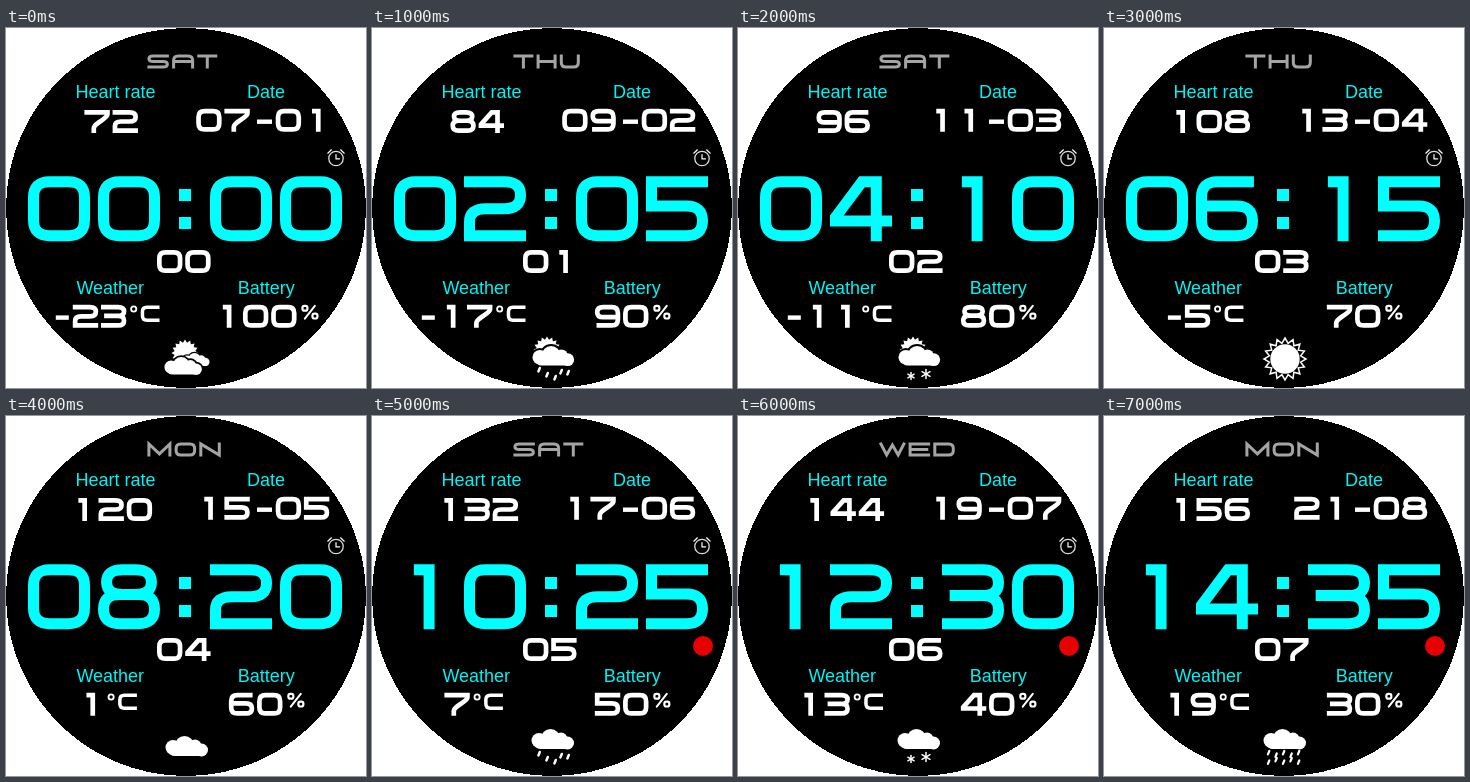
Recreate the animation shown at these times as an HTML page. Size 360 by 360 pixels, loop 8 s.

```html
<!DOCTYPE html>
<html lang="en">
<head>
<meta charset="utf-8">
<title>Watch face</title>
<style>
  html, body { margin: 0; width: 100%; height: 100%; overflow: hidden; background: #fff; }
  svg { display: block; width: 100vw; height: 100vh; }
  text { font: 18px "Liberation Sans", Arial, sans-serif; fill: #00f4f4; }
  .line { fill: none; stroke-linecap: square; stroke-linejoin: miter; }
  .thin { fill: none; stroke: #fff; stroke-linecap: round; }
  .soft { filter: blur(.55px); }
</style>
</head>
<body>
<svg viewBox="0 0 360 360">
  <circle cx="180" cy="180" r="180" shape-rendering="crispEdges"/>
  <text x="69.4" y="70">Heart rate</text>
  <text x="241" y="70">Date</text>
  <text x="70.4" y="266">Weather</text>
  <text x="231.7" y="266">Battery</text>
  <g id="live"></g>
</svg>
<script>
// Corner points of each glyph in a unit box; "!" keeps a corner sharp.
const GLYPHS = {
  0: '0,0 1,0 1,1 0,1 z',
  1: '.39,0 .58,0! .58,1',
  2: '0,0 1,0 1,.5 0,.5 0,1! 1,1',
  3: '0,0 1,0 1,.48 .15,.48|.15,.48 1,.48 1,1 0,1',
  4: '1,.73 0,.73! 0,.66! .52,0! .8,0! .8,1',
  5: '1,0 0,0! 0,.45! 1,.45 1,1 0,1',
  6: '.92,0 0,0 0,1 1,1 1,.45 0,.45',
  7: '0,0 1,0! 1,.22 .34,.74 .34,1',
  8: '.06,0 .94,0 .94,.46 .06,.46 z|0,.46 1,.46 1,1 0,1 z',
  9: '.08,1 1,1 1,0 0,0 0,.55 1,.55',
  S: '1,0 0,0 0,.5 1,.5 1,1 0,1',
  A: '0,1 0,0 1,0 1,1|0,.5 1,.5',
  T: '0,0 1,0|.5,0 .5,1',
  H: '0,0 0,1|1,0 1,1|0,.5 1,.5',
  U: '0,0 0,1 1,1 1,0',
  M: '0,1 0,0! .5,.9! 1,0! 1,1',
  O: '0,0 1,0 1,1 0,1 z',
  N: '0,1 0,0! 1,1! 1,0',
  W: '0,0 .25,1! .5,.1! .75,1! 1,0',
  E: '1,0 0,0! 0,1! 1,1|0,.5 .9,.5',
  D: '0,0! 1,0 1,1 0,1! z',
  C: '1,0 0,0 0,1 1,1'
};
const LETTER_W = { S: 21.5, A: 22, T: 20, H: 20, U: 20, M: 24, W: 26 };
const BIG = { w: 62, h: 65, s: 11, r: 16, pitch: 70, color: '#0ff' };
const SMALL = { w: 25.4, h: 23, s: 4.7, r: 6, pitch: 28.2, color: '#fff' };
const DAY = { h: 14, s: 3, r: 4.5, color: '#a4a4a4' };
const DAYS = ['SAT', 'THU', 'SAT', 'THU', 'MON', 'SAT', 'WED', 'MON'];

const pad = n => String(n).padStart(2, '0');
const circle = (x, y, r, attr = 'fill="#fff"') => `<circle cx="${x}" cy="${y}" r="${r}" ${attr}/>`;
const thin = (d, w) => `<path class="thin" d="${d}" stroke-width="${w}"/>`;

function trace(spec, place, r) {
  const closed = spec.endsWith('z');
  const pts = spec.replace(' z', '').split(' ').map(t => ({
    sharp: t.endsWith('!'),
    p: place(...t.replace('!', '').split(',').map(Number))
  }));
  const n = pts.length;
  const toward = (a, b) => {
    const len = Math.hypot(b[0] - a[0], b[1] - a[1]);
    const k = Math.min(r, len / 2) / len;
    return [a[0] + (b[0] - a[0]) * k, a[1] + (b[1] - a[1]) * k];
  };
  const steps = pts.map(({ p, sharp }, i) => {
    if (sharp || (!closed && (i === 0 || i === n - 1))) return p.join();
    const from = toward(p, pts[(i + n - 1) % n].p);
    const to = toward(p, pts[(i + 1) % n].p);
    return `${from} Q${p} ${to}`;
  });
  return 'M' + steps.join(' L') + (closed ? 'Z' : '');
}

function glyph(ch, x, y, { w, h, s, r, color }) {
  const place = (u, v) => [x + s / 2 + u * (w - s), y + s / 2 + v * (h - s)];
  const d = GLYPHS[ch].split('|').map(part => trace(part, place, r)).join('');
  return `<path class="line" d="${d}" stroke="${color}" stroke-width="${s}"/>`;
}

const digits = (text, x, y, font) =>
  [...String(text)].map((ch, i) => glyph(ch, x + i * font.pitch, y, font)).join('');

const dash = (x, y, w) => `<rect x="${x}" y="${y}" width="${w}" height="4.4" fill="#fff"/>`;

function weekday(name) {
  let x = 141.4;
  return [...name].map(ch => {
    const w = LETTER_W[ch] || 21.5;
    const out = glyph(ch, x, 26.5, { ...DAY, w });
    x += w + 3.2;
    return out;
  }).join('');
}

function clock(h, m) {
  const dot = y => `<rect x="173" y="${y}" width="12" height="12" fill="#0ff"/>`;
  return digits(pad(h), 22, 148.2, BIG) + digits(pad(m), 204, 148.2, BIG) + dot(161) + dot(189);
}

function heartRate(n) {
  const count = String(n).length;
  return digits(n, 105.2 - (count * SMALL.pitch - 2.8) / 2, 82, SMALL);
}

const date = (d, m) =>
  digits(pad(d), 190.2, 80.8, SMALL) + dash(251, 91.5, 15) + digits(pad(m), 269.7, 80.8, SMALL);

function temperature(t) {
  const text = String(Math.abs(t));
  const minus = t < 0 ? 17 : 0;
  const num = text.length * SMALL.pitch;
  const x = 102 - (minus + num + 31) / 2;
  const unit = x + minus + num;
  return (minus ? dash(x, 287.4, 13) : '') + digits(text, x + minus, 276.8, SMALL) +
    circle(unit + 4.5, 281, 2.6, 'fill="none" stroke="#fff" stroke-width="1.8"') +
    glyph('C', unit + 11.5, 277.6, { w: 18.8, h: 16.5, s: 3.5, r: 4.5, color: '#fff' });
}

function battery(n) {
  const num = String(n).length * SMALL.pitch;
  const x = 260.8 - (num + 19.5) / 2;
  const u = x + num + 2;
  const ring = { w: 7.2, h: 7, s: 2.2, r: 2, color: '#fff' };
  return digits(n, x, 276.8, SMALL) + glyph(0, u, 276.8, ring) +
    glyph(0, u + 10, 284.6, ring) + thin(`M${u + 3.5} 290.6L${u + 13.5} 277.8`, 2);
}

function star(x, y, outer, inner, count, attr) {
  const pts = Array.from({ length: count * 2 }, (_, i) => {
    const a = i * Math.PI / count - Math.PI / 2, r = i % 2 ? inner : outer;
    return [x + r * Math.cos(a), y + r * Math.sin(a)].map(v => v.toFixed(2)).join();
  });
  return `<polygon points="${pts.join(' ')}" ${attr}/>`;
}

const sun = (x, y, r) =>
  star(x, y, r, r * .76, 16, 'fill="none" stroke="#fff" stroke-width="1.5"') + circle(x, y, r * .7);
const smallSun = (x, y) => star(x, y, 13.5, 10.5, 16, 'fill="#fff"');

// A cloud 43 wide and 20 high, with a dark rim that separates it from what lies behind.
function cloud(x, y, k = 1) {
  const shape = circle(8, 11.5, 7.5, '') + circle(19.5, 9.5, 9.5, '') + circle(30, 10, 6.5, '') +
    circle(36.5, 14, 6.5, '') + '<rect x="4" y="9" width="35" height="11" rx="5.5"/>';
  return `<g transform="translate(${x} ${y}) scale(${k})">` +
    `<g stroke="#000" stroke-width="4">${shape}</g><g fill="#fff">${shape}</g></g>`;
}

const rain = (list, w) => list.map(([x, y]) => thin(`M${x + .8} ${y}l-1.4 3.4`, w)).join('');

const flake = (x, y, r) => [0, 1, 2].map(i => {
  const dx = r * Math.sin(i * Math.PI / 3), dy = r * Math.cos(i * Math.PI / 3);
  return thin(`M${x - dx} ${y - dy}L${x + dx} ${y + dy}`, 1.5);
}).join('');

const light = y => rain([[167, y], [175, y + 5], [183, y + 8], [189, y + 2], [196, y + 3]], 2.5);
const heavy = () => rain(Array.from({ length: 10 }, (_, i) =>
  [164.5 + i % 5 * 7.5, 335 + (i > 4) * 7 + i % 2 * 2.5]), 2.2);
const brightCloud = () => smallSun(175, 322) + cloud(160, 318, .98);

const WEATHER = [
  () => smallSun(179, 325) + cloud(176, 325, .64) + cloud(158, 329, .88),
  () => brightCloud() + light(340),
  () => brightCloud() + flake(173, 348, 3.6) + flake(188, 346, 4.6),
  () => sun(181, 331, 21),
  () => cloud(159, 320),
  () => cloud(159, 313) + light(336),
  () => cloud(159, 313) + flake(173, 343, 3.6) + flake(188, 341, 4.6),
  () => cloud(159, 313) + heavy()
];

const alarm = () => circle(330, 130.5, 7.2, 'fill="none" stroke="#ddd" stroke-width="1.3"') +
  thin('M330 126.5v4.3h3.6M321.8 125.2l3.6-3.4M338.2 125.2l-3.6-3.4', 1.2);

function face(n) {
  const numbers = weekday(DAYS[n]) + heartRate(72 + 12 * n) + date(7 + 2 * n, 1 + n) +
    clock(2 * n, 5 * n) + digits(pad(n), 151, 222, SMALL) +
    temperature(6 * n - 23) + battery(100 - 10 * n);
  return `<g class="soft">${numbers}</g>` + WEATHER[n]() +
    (n < 7 ? alarm() : '') + (n > 4 ? circle(331, 230, 10, 'fill="#e60000"') : '');
}

const live = document.getElementById('live');
let shown = -1;
function tick() {
  const n = Math.floor(performance.now() / 1000) % 8;
  if (n !== shown) live.innerHTML = face(shown = n);
  requestAnimationFrame(tick);
}
tick();
</script>
</body>
</html>
```
